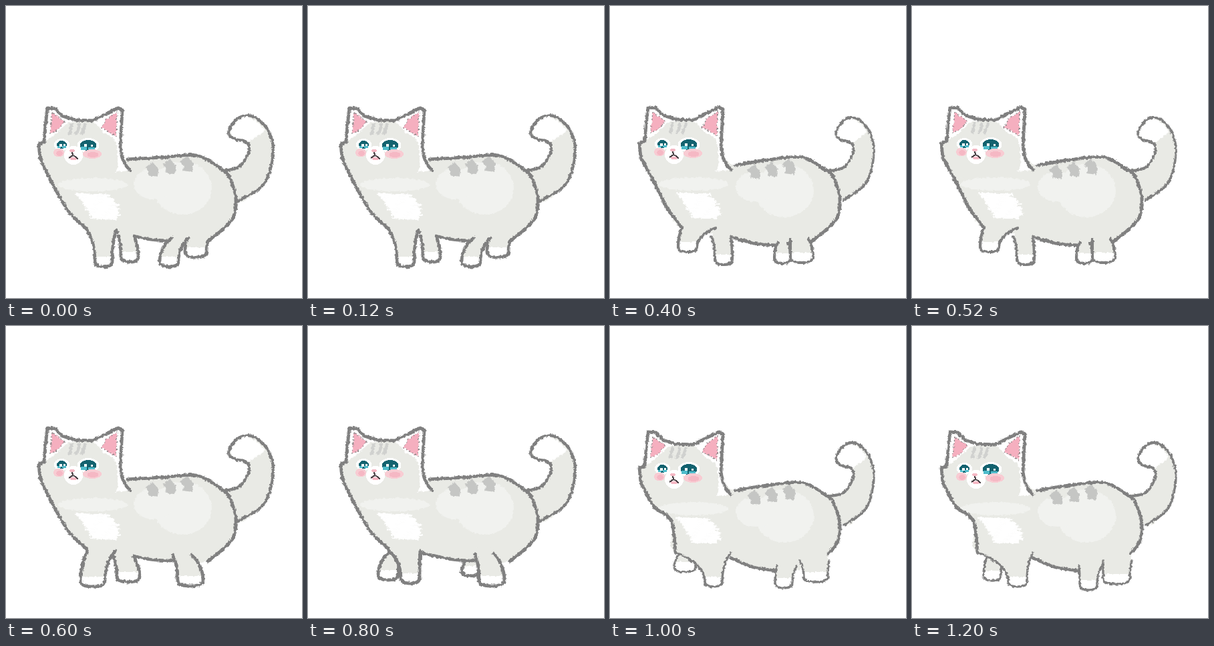
Write an HTML page that moves like this. It is 443 px wide and 438 px high and loops after 1.4 s.

```html
<!DOCTYPE html>
<html lang="en">
<head>
<meta charset="utf-8">
<title>Walking cat</title>
<style>
  html, body { margin: 0; width: 100%; height: 100%; overflow: hidden; background: #fff; }
  #reel { display: block; width: 3101px; height: 438px; animation: walk 1.4s steps(7, end) infinite; }
  @keyframes walk { to { transform: translateX(-3101px); } }
  .line { fill: none; stroke: #808080; stroke-linecap: round; stroke-linejoin: round; }
  .fur { fill: #e9eae5; }
  .light { fill: #f1f2ef; }
  .white { fill: #fff; }
  .stripe { fill: none; stroke: #c5c6c4; stroke-width: 14; }
  .brow { fill: none; stroke: #d0d1cf; stroke-width: 4.5; }
  .bib { stroke: #fff; stroke-width: 2.6; }
  .ear { fill: #f5afbf; stroke: #8d8688; stroke-width: 1.4; stroke-dasharray: 2 3; }
  .face { shape-rendering: crispEdges; }
  .iris { fill: #13626f; }
  .glow { fill: #4fbccb; }
  .blush { fill: #f8ccd3; }
  .pink { fill: #f5b8c4; }
  .mouth { fill: none; stroke: #4c4347; stroke-width: 2; }
</style>
</head>
<body>
<svg id="reel" viewBox="0 0 3101 438" xmlns="http://www.w3.org/2000/svg">
  <defs>
    <filter id="rough" filterUnits="userSpaceOnUse" x="0" y="0" width="443" height="438" color-interpolation-filters="sRGB">
      <feTurbulence type="fractalNoise" baseFrequency="0.25" numOctaves="2" seed="4"/>
      <feDisplacementMap in="SourceGraphic" scale="4.5" xChannelSelector="R" yChannelSelector="G"/>
    </filter>
  </defs>
</svg>
<script>
const W = 443;
const reel = document.getElementById('reel');

// Catmull-Rom curve through "x,y x,y ..." points
function curve(text, closed) {
  const p = text.split(' ').map(s => s.split(',').map(Number));
  const n = p.length;
  const at = i => closed ? p[(i + n) % n] : p[Math.max(0, Math.min(n - 1, i))];
  const mix = (a, b, c) => b.map((v, k) => v + (c[k] - a[k]) / 6);
  let d = 'M' + p[0];
  for (let i = 0; i < (closed ? n : n - 1); i++) {
    d += `C${mix(at(i - 1), at(i), at(i + 1))} ${mix(at(i + 2), at(i + 1), at(i))} ${at(i + 1)}`;
  }
  return d + (closed ? 'Z' : '');
}

const path = (d, cls) => `<path class="${cls}" d="${d}"/>`;
const line = (d, pen = 4.8) => `<path class="line" stroke-width="${pen}" d="${d}"/>`;
const oval = (x, y, rx, ry, cls) => `<ellipse class="${cls}" cx="${x}" cy="${y}" rx="${rx}" ry="${ry}"/>`;
const box = (x, y, w, h, cls) => `<rect class="${cls}" x="${x}" y="${y}" width="${w}" height="${h}"/>`;
const shift = (x, y, body) => `<g transform="translate(${x} ${y})">${body}</g>`;
const repeat = (n, fn) => Array.from({ length: n }, (_, i) => fn(i)).join('');

function random(seed) {
  return () => (seed = seed * 16807 % 2147483647) / 2147483647;
}

// l, r: top edges at height y; x, floor: middle of the sole; w: half its width
function leg([l, r, y, x, floor, w], pen) {
  const h = floor - y, a = x - w, b = x + w;
  const hip = y + h * .15, knee = floor - h * .55, ankle = floor - 8;
  const sole = `Q${a} ${floor} ${x} ${floor}Q${b} ${floor} ${b} ${ankle}`;
  const edge = `M${l} ${y}C${(l + a) / 2} ${hip} ${a} ${knee} ${a} ${ankle}${sole}` +
    `C${b} ${knee} ${(r + b) / 2} ${hip} ${r} ${y}`;
  return path(`${edge}L${r - 4} ${y - 14}H${l + 4}Z`, 'fur') +
    path(`M${a} ${floor - 15}V${ankle}${sole}V${floor - 15}Z`, 'white') +
    line(edge, pen);
}

function eye(x, y, w, h) {
  return oval(x, y, w + 4, h + 3, 'white') + oval(x, y, w, h, 'iris') +
    box(x - w * .9, y + h * .3, w * .7, h * .6, 'glow') + box(x, y + h * .35, w * .8, h * .55, 'glow') +
    box(x - w * .5, y - h * .2, 4, 4, 'white') + box(x + w * .3, y - 1, 3, 3, 'white');
}

const cheek = (x, y, rx, ry) => oval(x, y, rx, ry, 'blush') + oval(x + 1, y + 1, rx * .6, ry * .6, 'pink');

const skull = '51,228 49,207 57,204 59,180 62,153 74,154 84,165 104,171 130,172 147,163 168,153 174,156 171,212 174,228 180,240 186,247';
const headFur = `<polygon class="white" points="${skull} 150,250 65,245"/>` +
  path(curve('50,210 72,194 92,176 106,174 130,174 146,189 163,202 167,225 162,250 118,265 70,255 52,228', true), 'fur');
const headLines = path('M69 160L66 191L76 187L88 174Z', 'ear') +
  path('M166 159L165 195L143 183L150 170Z', 'ear') +
  repeat(3, i => path(`M${99 + 10 * i} 176q${-3 * (i % 2 ? -.2 : 1)} 10 ${-4 - i} 17`, 'brow')) +
  `<polyline class="line" stroke-width="4.8" points="${skull}"/>`;
const face = '<g class="face">' +
  oval(101, 224, 14, 14, 'white') + eye(83.5, 208, 7.5, 6) + eye(123, 209, 12.5, 8) +
  cheek(79, 220, 8, 6.5) + cheek(129, 222, 14, 7) +
  oval(99, 217, 4, 2, 'pink') + oval(101, 229, 5, 2, 'pink') +
  path('M99 219l1 5l-6 4M100 224l4 2l4 4', 'mouth') + '</g>';

const rand = random(7);
const bib = repeat(18, i => {
  const y = 282 + 2.1 * i;
  const x1 = 103 + 1.3 * i + 6 * rand();
  const x2 = 152 + 2.2 * Math.min(i, 7) + 10 * (rand() - .5);
  return `<line class="bib" x1="${x1}" x2="${x2}" y1="${y}" y2="${y + 2}"/>`;
});
const collar = oval(130, 268, 52, 10, 'light');
const flank = oval(264, 273, 44, 40, 'light') + oval(221, 267, 30, 23, 'light') +
  repeat(3, i => path(`M${214 + 26 * i} ${238 - 4.5 * i}l7 9l-1 ${8 + i}`, 'stripe'));

const tailEdge = '314,249 345,243 358,230 364,213 358,203 344,200 333,191 343,172 361,164 380,172 394,190 400,215 394,250 380,273 347,293';
const tail = path(curve(tailEdge, true), 'fur') +
  path(curve('359,203 336,191 345,174 361,166 386,185 370,199', true), 'white') +
  line(curve(tailEdge), 4.2);
const rump = '302,353 337,322 344,290 334,256 321,244';

const tall = {
  head: [0, 0], flank: [0, 0], drop: 0, tail: '', pen: 4.8,
  chest: '51,228 62,252 80,286 96,311 121,335',
  belly: '168,340 215,350 250,352',
  back: '321,243 285,224 235,227 182,230'
};
const low = {
  head: [-5, -1], flank: [-3, 4], drop: 0, tail: 'translate(55 9.5) scale(.85 .96)', pen: 4.2,
  chest: '46,227 61,255 72,276 86,304 108,333',
  belly: '178,345 215,356 250,359',
  back: '322,246 288,227 235,231 187,239'
};
const crouch = {
  ...low, head: [-5, 6], flank: [-3, 12], drop: 8, pen: 3.4,
  chest: '46,234 66,271 85,284 94,300 98,339',
  belly: '181,348 215,362 250,367',
  back: '322,253 288,235 235,239 187,247'
};

// far legs sit behind the body, near legs in front
function cat(pose, far, near) {
  const { head: [hx, hy], drop, chest, belly, back, pen } = pose;
  const hind = rump.replace(/,(\d+)/g, (_, y) => ',' + (+y + drop));
  const body = [chest, belly, hind, back, `${166 + hx},${226 + hy} ${90 + hx},${220 + hy}`].join(' ');
  const legs = list => list.map(l => leg(l, pen)).join('');
  return '<g filter="url(#rough)">' +
    shift(0, drop, `<g transform="${pose.tail}">${tail}</g>`) +
    legs(far) + path(curve(body, true), 'fur') +
    shift(hx, hy, headFur + collar + bib) + shift(...pose.flank, flank) +
    [chest, belly, hind, back].map(p => line(curve(p))).join('') +
    legs(near) + shift(hx, hy, headLines) + '</g>' + shift(hx, hy, face);
}

const stand = cat(tall, [[270, 303, 350, 284, 377, 16]],
  [[168, 191, 345, 185, 384, 13], [122, 165, 337, 146, 391, 13], [248, 273, 348, 244, 391, 14]]);
const stride = cat(tall, [],
  [[161, 190, 346, 183, 384, 17], [122, 163, 338, 130, 391, 18], [250, 278, 344, 276, 390, 19]]);
const lift = cat(low, [],
  [[270, 297, 350, 287, 385, 17], [152, 181, 346, 170, 388, 13], [108, 158, 333, 116, 369, 14], [251, 267, 355, 258, 386, 12]]);
const plant = cat(tall, [[124, 142, 338, 120, 381, 15], [238, 260, 350, 243, 375, 13]],
  [[121, 168, 337, 153, 386, 14], [250, 278, 342, 275, 390, 19]]);
const creep = cat(crouch, [[104, 132, 342, 112, 369, 16]],
  [[98, 181, 340, 155, 391, 13], [250, 279, 360, 260, 393, 13], [284, 328, 352, 308, 384, 18]]);
const settle = cat(crouch, [[114, 138, 344, 120, 382, 13]],
  [[98, 181, 340, 158, 391, 14], [250, 284, 360, 264, 396, 13], [286, 329, 352, 306, 387, 20]]);

const steps = [stand, stride, lift, stride, plant, creep, settle];
reel.insertAdjacentHTML('beforeend', steps.map((s, i) => shift(i * W, 0, s)).join(''));
</script>
</body>
</html>
```
